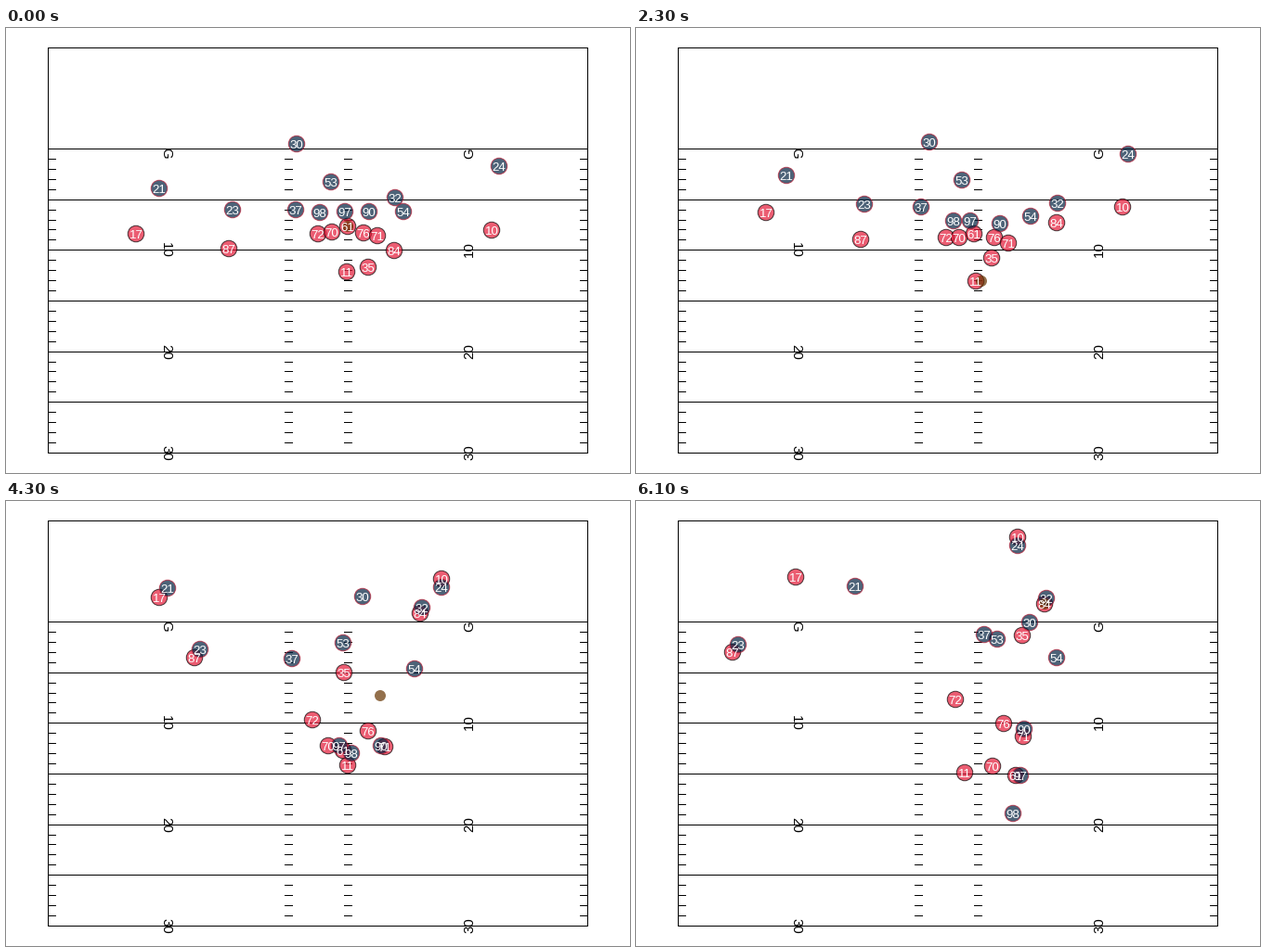
A matplotlib script for the animation above (6.2 s loop, 672 by 480 pixels).

```python
import numpy as np
import matplotlib.pyplot as plt
from matplotlib.animation import FuncAnimation
from matplotlib.patches import Circle

W, H, DPI = 672, 480, 96
STEP, FRAMES = 100, 62
PX = 72 / DPI  # points per pixel

LEFT, RIGHT, TOP, GOAL, BOTTOM = 45, 626, 21, 130, 458
YARD = 10.93
RED, NAVY, BROWN = "#e31837", "#02213f", "#663300"
SNAP, END = 1.6, 6.1  # seconds

plt.rcParams["font.family"] = "Liberation Sans"
fig = plt.figure(figsize=(W / DPI, H / DPI), dpi=DPI, facecolor="white")
ax = fig.add_axes([0, 0, 1, 1])
ax.set_xlim(0, W)
ax.set_ylim(H, 0)
ax.axis("off")


# --- field ---------------------------------------------------------------

def line(x0, y0, x1, y1):
    ax.plot([x0 + 0.5, x1 + 0.5], [y0 + 0.5, y1 + 0.5], color="black",
            lw=PX, snap=False, solid_capstyle="projecting", zorder=1)


def yard_y(yard):
    return round(GOAL + yard * YARD)


def draw_field():
    for y in [TOP] + [yard_y(k) for k in range(0, 31, 5)]:
        line(LEFT, y, RIGHT, y)
    for x in (LEFT, RIGHT):
        line(x, TOP, x, BOTTOM)
    for k in range(1, 30):
        if k % 5:
            for x in (LEFT, 300, 364, RIGHT - 8):
                line(x, yard_y(k), x + 8, yard_y(k))
    for k in range(0, 31, 10):
        label, y = (str(k), yard_y(k)) if k else ("G", GOAL + 5)
        for x, angle in ((168, 270), (503, 90)):
            ax.text(x, y, label, rotation=angle, rotation_mode="anchor",
                    ha="center", va="baseline", size=15 * PX, zorder=1)


# --- motion: each helper returns a function from time to position --------

def ramp(t, start, end):
    return min(max((t - start) / (end - start), 0), 1)


def ease(u):
    return u * u * (3 - 2 * u)


def route(*points, motion=(0, 0)):
    """Smooth run from a standing start, points evenly spaced in time.

    motion is the ground covered before the snap."""
    p = np.array(points, float)
    slope = np.gradient(p, axis=0)
    slope[0] = 0
    last = len(p) - 1

    def at(t):
        s = ramp(t, SNAP, END) * last
        i = min(int(s), last - 1)
        u = s - i
        run = (p[i] + (p[i + 1] - p[i]) * ease(u)
               + u * (1 - u) * ((1 - u) * slope[i] - u * slope[i + 1]))
        return run - np.array(motion) * (1 - ramp(t, 0, SNAP))

    return at


def cover(receiver, cushion, trail, start, end):
    """Man coverage: the cushion closes to a trailing position."""
    cushion, trail = np.array(cushion), np.array(trail)

    def at(t):
        return receiver(t) + cushion + (trail - cushion) * ease(ramp(t, start, end))

    return at


def push(x, y, flow, strength):
    """Start at a place on the line and get carried along by a flow."""
    return lambda t: np.array([x, y]) + strength * flow(t)


# The middle of the line slides left, then spins right; the right side sags.
middle = route((0, 0), (-11, 47), (41, 82))
side = route((0, 0), (6, 40), (17, 30))

offense = {
    17: route((140, 222), (143, 155), (169, 95), (172, 82)),
    87: route((240, 238), (237, 205), (190, 163), (104, 163)),
    10: route((523, 218), (516, 144), (457, 72), (411, 39)),
    84: route((447, 232), (459, 168), (443, 114), (440, 111), motion=(29, -8)),
    35: route((390, 258), (371, 225), (367, 176), (416, 145)),
    11: route((367, 263), (365, 288), (368, 285), (354, 293)),
    72: route((336, 222), (328, 238), (344, 214)),
    70: push(351, 220, middle, 0.8),
    61: push(368, 214, middle, 1),
    76: push(385, 221, side, 0.65),
    71: push(400, 224, side, 1),
}

defense = {
    21: route((165, 173), (161, 132), (181, 88), (236, 92)),
    24: cover(offense[10], (8, -69), (0, 9), SNAP, 4.4),
    23: cover(offense[87], (4, -42), (6, -8), SNAP, 4.6),
    32: cover(offense[84], (1, -57), (2, -6), 0, 3.6),
    30: route((313, 125), (330, 118), (395, 103), (424, 131)),
    54: route((428, 198), (423, 207), (444, 176), (453, 169)),
    53: route((350, 166), (358, 154), (389, 149)),
    37: route((312, 196), (298, 176), (375, 144)),
    98: route((338, 199), (365, 257), (406, 337)),
    97: push(365, 198, middle, 1.2),
    90: push(391, 198, side, 1.6),
}


def ball_at(t):
    """Snap to the passer, wind up, throw to the receiver."""
    swing = np.radians(120) * ramp(t, 3.0, 3.9)
    hand = offense[11](t) + 6 * np.array([np.cos(swing), np.sin(swing)])
    center = offense[61](t)
    held = center + (hand - center) * ramp(t, 1.4, 1.8)
    return held + (offense[84](t) - held) * ramp(t, 3.85, 4.8)


# --- drawing -------------------------------------------------------------

def disc(radius, fill, edge, zorder):
    return ax.add_patch(Circle((0, 0), radius, facecolor=fill, edgecolor=edge,
                               alpha=0.7, lw=PX, snap=False, zorder=zorder))


def add_team(team, fill, edge, zorder):
    for number, path in team.items():
        label = ax.text(0, 0, str(number), color="white", size=13.3 * PX,
                        ha="center", va="baseline", zorder=5)
        players.append((path, disc(8.75, fill, edge, zorder), label))


players = []
draw_field()
add_team(offense, RED, "black", 2)
add_team(defense, NAVY, "#b81a32", 3)
ball = disc(6, BROWN, "none", 4)


def update(frame):
    t = frame * STEP / 1000
    for path, mark, label in players:
        x, y = np.round(path(t))
        mark.center = x, y
        label.set_position((x, y + 4.6))
    ball.center = tuple(np.round(ball_at(t)))
    return []


anim = FuncAnimation(fig, update, frames=FRAMES, interval=STEP,
                     init_func=lambda: update(0), repeat=True, repeat_delay=0)
plt.show()
```
